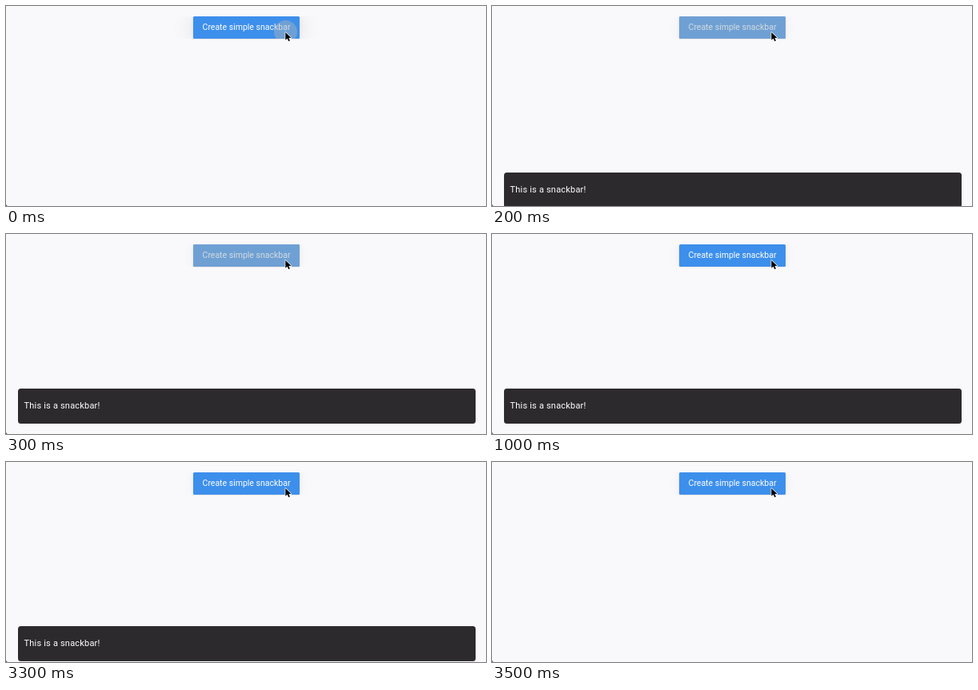
Animation of 600x251 px, one loop 5 s. Source, as an HTML page:

```html
<!DOCTYPE html>
<html lang="en">
<head>
<meta charset="utf-8">
<title>Snackbar</title>
<style>
  html, body { margin: 0; width: 100%; height: 100%; overflow: hidden; }
  body { position: relative; background: #f9f8fa; font-family: Roboto, Arial, sans-serif; }
  div, svg { position: absolute; }
  #button {
    left: 234px; top: 13px; width: 133px; height: 27.5px; border-radius: 1.5px;
    background: #3d8fec; color: #fff; clip-path: inset(0 -30px -1px);
    font-size: 10.5px; line-height: 27px; text-align: center; white-space: nowrap;
  }
  #clip { inset: 0; overflow: hidden; border-radius: inherit; }
  #ripple { border-radius: 50%; background: rgba(166, 178, 184, .48); }
  #bar {
    left: 15px; top: 194px; width: 572px; height: 44px; border-radius: 3.5px;
    box-sizing: border-box; padding-left: 7.5px; background: #2d2a2e; color: #fff;
    font-size: 11px; letter-spacing: .2px; line-height: 44px; white-space: nowrap;
  }
  svg { left: 0; top: 0; }
</style>
</head>
<body>
<div id="button">Create simple snackbar<div id="clip"><div id="ripple"></div></div></div>
<div id="bar">This is a snackbar!</div>
<svg width="600" height="251">
  <path d="M0 248.5 Q.3 250.7 2 251 H0Z" fill="#444"/>
  <path d="M349.3 33 v9.8 l2.3 -2.1 l1.6 3.5 l1.7 -.7 l-1.5 -3.5 h3.1Z"
        fill="#000" stroke="#fff" stroke-width="1.4" paint-order="stroke" stroke-linejoin="round"/>
</svg>
<script>
const LOOP = 5000;
const TICK = 100;
const SLIDE = { shown: 314, leave: 3200, duration: 300, distance: 74, power: 1.66 };
const CLICK = { x: 115, y: 19.5 };   // inside the button

const button = document.getElementById("button");
const ripple = document.getElementById("ripple");
const bar = document.getElementById("bar");

const clamp = value => Math.min(1, Math.max(0, value));

// The bar leaves with an ease-in and enters along the same curve reversed.
function slideOffset(time) {
  const elapsed = time < SLIDE.leave ? SLIDE.shown - time : time - SLIDE.leave;
  return Math.round(SLIDE.distance * clamp(elapsed / SLIDE.duration) ** SLIDE.power);
}

function draw() {
  const time = Math.floor(performance.now() % LOOP / TICK) * TICK;
  const press = clamp(1 - time / 150);
  const radius = 14.5 + 110 * clamp(time / 150);

  bar.style.transform = `translateY(${slideOffset(time)}px)`;
  button.style.boxShadow =
    `0 1px 2px rgba(0,0,0,.16), 0 1px ${16 + 12 * press}px rgba(0,0,0,${.05 + .08 * press})`;
  Object.assign(ripple.style, {
    left: CLICK.x - radius + "px",
    top: CLICK.y - radius + "px",
    width: 2 * radius + "px",
    height: 2 * radius + "px",
    opacity: clamp(1 - (time - 300) / 350)
  });
  requestAnimationFrame(draw);
}
draw();
</script>
</body>
</html>
```
